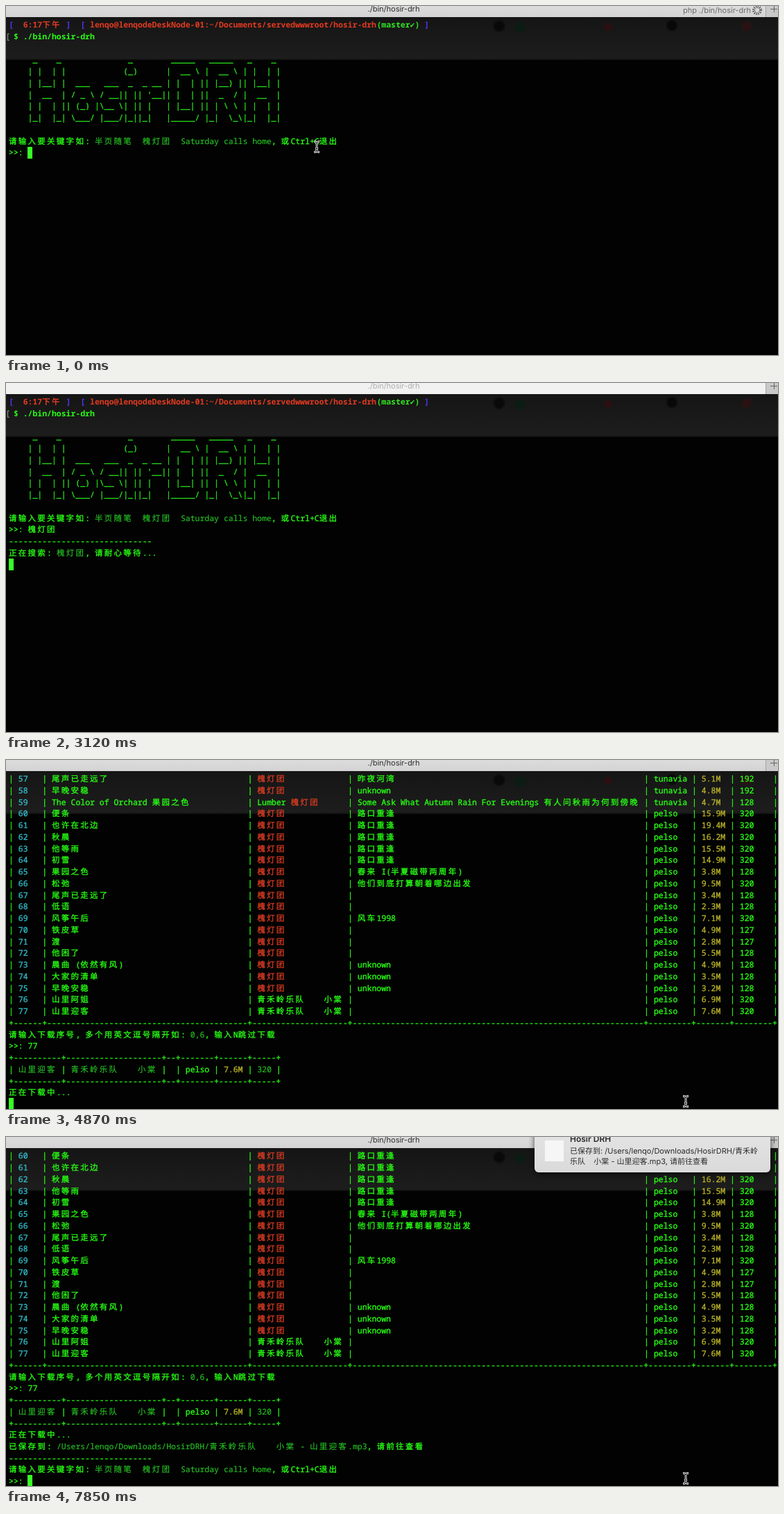
Write an HTML page that moves like this. It is 1113x503 px and loops after 8 s.

```html
<!DOCTYPE html>
<html lang="zh-CN">
<head>
<meta charset="utf-8">
<title>Terminal</title>
<style>
html, body { margin: 0; width: 100%; height: 100%; overflow: hidden; background: #020202; }
#stage {
  position: relative; width: 1113px; height: 503px; overflow: hidden;
  --row: 16.75px;
  text-rendering: geometricPrecision;
}
#stage * { animation-duration: 8s; animation-timing-function: step-end; animation-iteration-count: infinite; }
#stage div, #stage svg, .screen span { position: absolute; }

#glow {
  inset: 16px 0 auto; height: 62px;
  background:
    radial-gradient(circle at 711px 13px, #0a0909 6px, transparent 10px),
    radial-gradient(circle at 741px 15px, #0b1c14 5px, transparent 10px),
    radial-gradient(circle at 868px 14px, #2a1010 4px, transparent 8px),
    radial-gradient(circle at 960px 12px, #080808 6px, transparent 9px),
    radial-gradient(circle at 1068px 13px, #2b1212 5px, transparent 9px),
    linear-gradient(#151515, #1d1d1d 96%, #0a0a0a);
}

.screen {
  inset: 0; clip-path: inset(18px 0 0 0);
  font: 500 11.48px/16.75px "Noto Sans Mono", "Noto Sans CJK SC", "Noto Sans CJK JP", "DejaVu Sans Mono", monospace;
  color: #28fe14; -webkit-text-stroke: .35px;
}
.screen span { white-space: pre; }
.screen .wide { letter-spacing: 2.3px; }
.dim { color: #25bc24; -webkit-text-stroke: .2px; }
.art { color: #28e41c; }
.user { color: #e23a20; }
.branch { color: #31e722; }
.frame { color: #5136f5; }
.user, .branch, .frame, .bold { font-weight: 600; -webkit-text-stroke: 0; }
.red { color: #d83c22; }
.cyan { color: #33bbc8; }
.yellow { color: #b8b32a; }
.mark { color: #7d8a7d; }

#shell { inset: 0; animation-name: shell; }
#typed { inset: 0; animation-name: typed; }
#found { inset: 0; animation-name: found; }
#log { left: 0; top: 0; animation-name: log; }
#saved { left: 0; top: 0; animation-name: saved; }
#again { left: 0; top: 0; animation-name: again; }
#caret { width: 7px; height: 17px; background: #38fe26; animation-name: caret; }
#mouse { width: 12px; height: 18px; animation-name: mouse; }

#bar {
  inset: 0 0 auto; height: 16px; background: linear-gradient(#dcdcdc, #d4d4d4);
  font: 11px/14px Inter, "Open Sans", sans-serif; color: #2e2e2e;
  animation-name: bar;
}
#title { left: 0; width: 1118px; top: -3px; text-align: center; }
#job { inset: 0; color: #6b6b6b; animation-name: job; }
#job div { left: 976px; top: -1px; white-space: pre; }
#job svg { left: 1075px; top: -2px; }
#plus { left: 1095px; width: 18px; height: 16px; background: #c9c9c9; border-left: 1px solid #a2a2a2; box-sizing: border-box; }
#plus::before, #plus::after { content: ""; position: absolute; background: #666; }
#plus::before { left: 6px; top: 4px; width: 10px; height: 1px; }
#plus::after { left: 10.5px; top: 0; width: 1px; height: 9px; }

#note {
  left: 762px; top: -20px; width: 340px; height: 71px; border-radius: 6px;
  background: linear-gradient(#e6e6e6, #dadada); box-shadow: 0 2px 9px #000a;
  font: 11px/14.5px Inter, "Noto Sans CJK SC", "Noto Sans CJK JP", sans-serif; color: #2a2a2a;
  animation-name: note;
}
#note div { left: 51px; white-space: pre; }
#note .icon { left: 15px; top: 25px; width: 27px; height: 30px; background: #f6f6f6; }
#note .head { top: 16px; font-weight: 600; font-size: 12px; }
#note .body { top: 33px; }

@keyframes shell { 0% { opacity: 1 } 40.5%, 100% { opacity: 0 } }
@keyframes typed {
  0% { clip-path: inset(0 1082px 0 0) } 3.75% { clip-path: inset(0 1068px 0 0) }
  5.625% { clip-path: inset(0 1054px 0 0) } 7.5%, 100% { clip-path: inset(0) }
}
@keyframes found { 0% { opacity: 0 } 22.375%, 100% { opacity: 1 } }
@keyframes log {
  0% { opacity: 0; top: 0 } 40.5% { opacity: 1; top: 0 }
  79.625% { opacity: 1; top: calc(var(--row) * -1) }
  83.375%, 100% { opacity: 1; top: calc(var(--row) * -3) }
}
@keyframes saved { 0% { opacity: 0 } 79.625%, 100% { opacity: 1 } }
@keyframes again { 0% { opacity: 0 } 83.375%, 100% { opacity: 1 } }
@keyframes caret {
  0% { left: 31px; top: 203px; opacity: 1 }
  3.75% { left: 45px; top: 203px; opacity: 1 }
  5.625% { left: 59px; top: 203px; opacity: 1 }
  7.5% { left: 73px; top: 203px; opacity: 1 }
  18.625% { left: 73px; top: 203px; opacity: 0 }
  22.375% { left: 4px; top: 253px; opacity: 1 }
  29.75% { left: 4px; top: 253px; opacity: 0 }
  37.25% { left: 4px; top: 253px; opacity: 1 }
  40.5% { left: 4px; top: 487px; opacity: 1 }
  55.375% { left: 4px; top: 487px; opacity: 0 }
  60.875% { left: 4px; top: 487px; opacity: 1 }
  68.375% { left: 4px; top: 487px; opacity: 0 }
  74% { left: 4px; top: 487px; opacity: 1 }
  83.375% { left: 31px; top: 487px; opacity: 1 }
  92.625% { left: 31px; top: 487px; opacity: 0 }
  98.125%, 100% { left: 31px; top: 487px; opacity: 1 }
}
@keyframes mouse {
  0% { left: 442px; top: 194px; opacity: 1 }
  26.125% { left: 442px; top: 194px; opacity: 0 }
  40.5%, 100% { left: 974px; top: 483px; opacity: 1 }
}
@keyframes bar {
  0% { background: linear-gradient(#dcdcdc, #d4d4d4); color: #2e2e2e }
  37.25% { background: #f1f1f1; color: #b0b0b0 }
  42.25%, 100% { background: linear-gradient(#dcdcdc, #d4d4d4); color: #2e2e2e }
}
@keyframes job { 0% { opacity: 1 } 1.875%, 100% { opacity: 0 } }
@keyframes note {
  0% { transform: translateX(370px) } 83.375% { transform: translateX(230px) }
  85.25% { transform: translateX(90px) } 87.125% { transform: translateX(20px) }
  88.875%, 100% { transform: none }
}
</style>
</head>
<body>
<div id="stage">
  <div id="glow"></div>
  <div class="screen">
    <div id="shell"><div id="typed"></div><div id="found"></div></div>
    <div id="log"><div id="saved"></div><div id="again"></div></div>
  </div>
  <div id="caret"></div>
  <svg id="mouse" viewBox="0 0 12 18" fill="none">
    <path d="M2 1.5Q6 1.5 6 4V14Q6 16.5 2 16.5M10 1.5Q6 1.5 6 4M10 16.5Q6 16.5 6 14M4 11.5H8" stroke="#f4f4f4" stroke-width="2.8"/>
    <path d="M2.5 1.5Q6 1.5 6 4V14Q6 16.5 2.5 16.5M9.5 1.5Q6 1.5 6 4M9.5 16.5Q6 16.5 6 14M4.5 11.5H7.5" stroke="#111"/>
  </svg>
  <div id="bar">
    <div id="title">./bin/hosir-drh</div>
    <div id="job">
      <div>php ./bin/hosir-drh</div>
      <svg width="16" height="16"><circle cx="8" cy="8" r="5" fill="none" stroke="#555" stroke-width="4" stroke-dasharray="1.2 1.418"/></svg>
    </div>
    <div id="plus"></div>
  </div>
  <div id="note">
    <div class="icon"></div>
    <div class="head">Hosir DRH</div>
    <div class="body">已保存到: /Users/lenqo/Downloads/HosirDRH/青禾岭
乐队    小棠 - 山里迎客.mp3, 请前往查看</div>
  </div>
</div>
<script>
const CELL = 6.888, ROW = 16.75, LEFT = 4, TOP = 20.2;
const $ = id => document.getElementById(id);
const BAND = '槐灯团', DUO = '青禾岭乐队    小棠', TRACK = '山里迎客';

// Writes text on the character grid; CJK characters take two cells.
function put(host, row, col, text, cls = '') {
  for (const run of text.match(/[\u2e80-\u9fff]+|✔|[^\u2e80-\u9fff✔]+/g) || []) {
    const wide = /[\u2e80-\u9fff]/.test(run);
    const span = document.createElement('span');
    span.textContent = run;
    span.className = cls + (wide ? ' wide' : '');
    span.style.left = LEFT + col * CELL + 'px';
    span.style.top = TOP + row * ROW + 'px';
    host.append(span);
    col += run.length * (wide ? 2 : 1);
  }
  return col;
}

const line = (host, row, ...parts) =>
  parts.reduce((col, [text, cls]) => put(host, row, col, text, cls), 0);

const rule = widths => '+' + widths.map(n => '-'.repeat(n) + '+').join('');

const ask = (host, row) => {
  line(host, row, ['请输入要关键字如: '], [`半页随笔  ${BAND}  Saturday calls home`, 'dim'], [', 或Ctrl+C退出']);
  line(host, row + 1, ['>>: ']);
};

// Opening screen
const shell = $('shell');
line(shell, 0, ['[', 'frame'], ['  6:17下午', 'user'], [' ]  [ ', 'frame'],
  ['lenqo@lenqodeDeskNode-01:~/Documents/servedwwwroot/hosir-drh', 'user'],
  ['(master✔)', 'branch'], [' ]', 'frame']);
put(shell, 1, -0.7, '[', 'mark');
put(shell, 1, 1, '$ ./bin/hosir-drh', 'bold');
const banner = String.raw`
 _    _              _        _____   _____   _    _
| |  | |            (_)      |  __ \ |  __ \ | |  | |
| |__| |  ___   ___  _  _ __ | |  | || |__) || |__| |
|  __  | / _ \ / __|| || '__|| |  | ||  _  / |  __  |
| |  | || (_) |\__ \| || |   | |__| || | \ \ | |  | |
|_|  |_| \___/ |___/|_||_|   |_____/ |_|  \_\|_|  |_|
`;
banner.split('\n').forEach((text, i) => put(shell, i + 2, 4, text, 'art'));
ask(shell, 10);
put($('typed'), 11, 4, BAND);
put($('found'), 12, 0, '-'.repeat(30));
line($('found'), 13, ['正在搜索: '], [BAND, 'dim'], [', 请耐心等待...']);

// Result table: title;artist;album;source;size;rate
const songs = `尾声已走远了;@;昨夜河湾;tunavia;5.1M;192
早晚安稳;@;unknown;tunavia;4.8M;192
The Color of Orchard 果园之色;Lumber @;Some Ask What Autumn Rain For Evenings 有人问秋雨为何到傍晚;tunavia;4.7M;128
便条;@;路口重逢;pelso;15.9M;320
也许在北边;@;路口重逢;pelso;19.4M;320
秋晨;@;路口重逢;pelso;16.2M;320
他等雨;@;路口重逢;pelso;15.5M;320
初雪;@;路口重逢;pelso;14.9M;320
果园之色;@;春来 I(半夏磁带两周年);pelso;3.8M;128
松弛;@;他们到底打算朝着哪边出发;pelso;9.5M;320
尾声已走远了;@;;pelso;3.4M;128
低语;@;;pelso;2.3M;128
风筝午后;@;风车1998;pelso;7.1M;320
铁皮草;@;;pelso;4.9M;127
渡;@;;pelso;2.8M;127
他困了;@;;pelso;5.5M;128
晨曲 (依然有风);@;unknown;pelso;4.9M;128
大家的清单;@;unknown;pelso;3.5M;128
早晚安稳;@;unknown;pelso;3.2M;128
山里阿姐;${DUO};;pelso;6.9M;320
${TRACK};${DUO};;pelso;7.6M;320`.split('\n');

const log = $('log');
const widths = [6, 42, 20, 61, 9, 7, 8];
const bars = widths.reduce((cols, n) => [...cols, cols.at(-1) + n + 1], [0]);

songs.forEach((song, row) => {
  const [title, artist, album, source, size, rate] = song.split(';');
  const cell = (i, text, cls) => put(log, row, bars[i] + 2, text, cls);
  bars.forEach(col => put(log, row, col, '|'));
  cell(0, String(57 + row), 'cyan');
  cell(1, title);
  const [lead, hit] = artist.split('@');
  const end = cell(2, lead);
  if (hit !== undefined) put(log, row, end, BAND, 'red');
  cell(3, album);
  cell(4, source);
  cell(5, size, 'yellow');
  cell(6, rate);
});
put(log, 21, 0, rule(widths));
line(log, 22, ['请输入下载序号, 多个用英文逗号隔开如: '], ['0,6', 'dim'], [', 输入N跳过下载']);
put(log, 23, 0, '>>: 77');
const pick = rule([10, 20, 2, 7, 6, 5]);
put(log, 24, 0, pick);
line(log, 25, ['| '], [TRACK, 'dim'], [' | '], [DUO, 'dim'], [' |  | pelso | '],
  ['7.6M', 'yellow'], [' | '], ['320', 'dim'], [' |']);
put(log, 26, 0, pick);
put(log, 27, 0, '正在下载中...');
line($('saved'), 28, ['已保存到: '],
  [`/Users/lenqo/Downloads/HosirDRH/${DUO} - ${TRACK}.mp3`, 'dim'], [', 请前往查看']);
put($('again'), 29, 0, '-'.repeat(30));
ask($('again'), 30);
</script>
</body>
</html>
```
